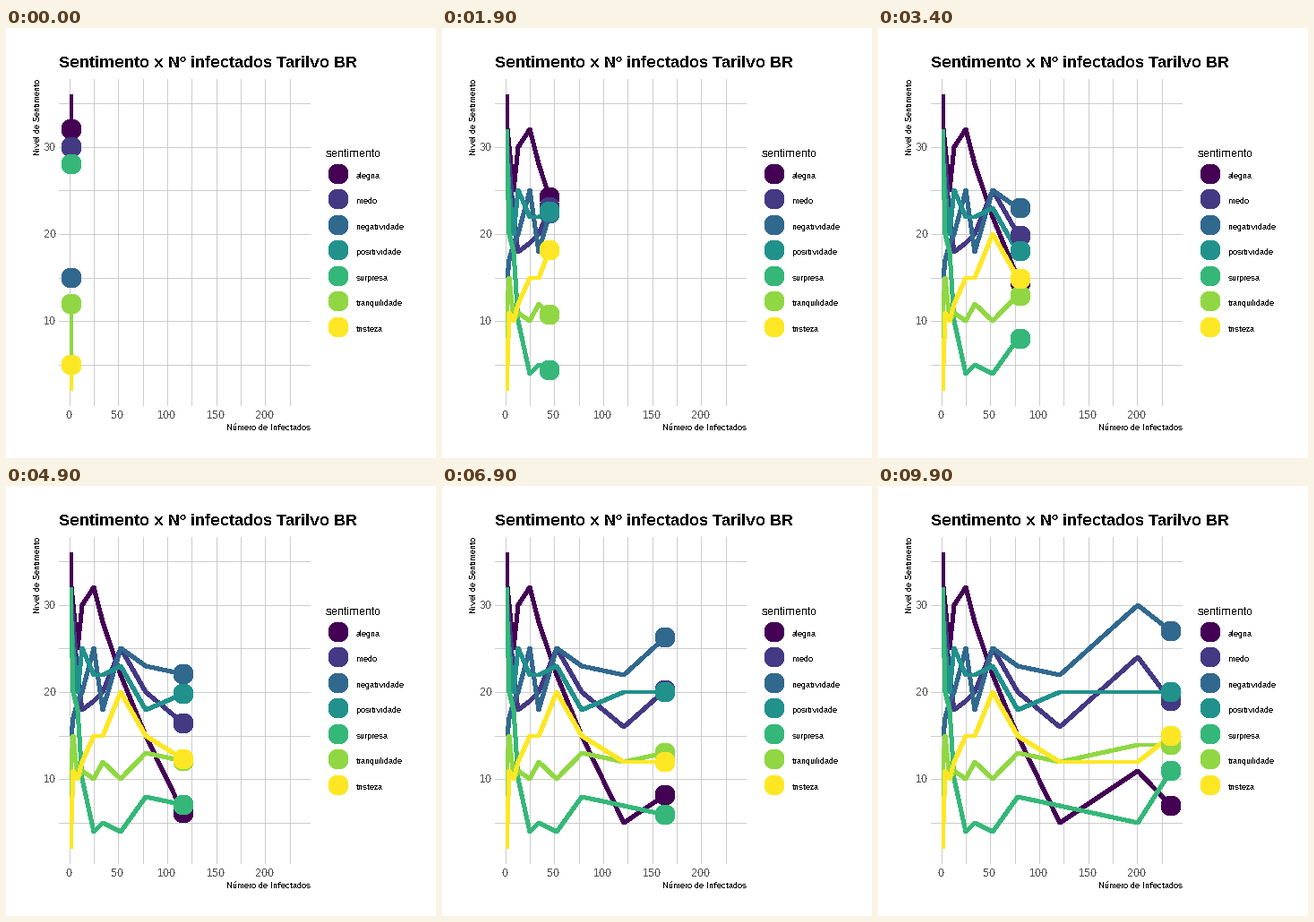
These frames come from a looping animation (480 px wide and 480 px high, 10 s). A matplotlib script:

```python
import numpy as np
import matplotlib.pyplot as plt
from matplotlib.animation import FuncAnimation
from matplotlib.patches import Circle

plt.rcParams.update({
    "font.family": "Liberation Sans",
    "text.hinting": "native",
    "text.hinting_factor": 1,
    "text.antialiased": False,
    "lines.antialiased": False,
    "patch.antialiased": False,
})

FRAMES = 100
PT = 0.72  # points per pixel at 100 dpi
RADIUS = 11

# turning points: case counts, and the level of each sentiment there
CASES = np.array([2, 2, 4, 8, 13, 25, 34, 52, 78, 121, 200, 234])
LEVELS = {
    "alegria": [36, 32, 30, 25, 30, 32, 28, 22, 15, 5, 11, 7],
    "medo": [30, 30, 28, 22, 18, 19, 20, 25, 20, 16, 24, 19],
    "negatividade": [15, 15, 17, 19, 20, 25, 18, 25, 23, 22, 30, 27],
    "positividade": [28, 28, 25, 20, 25, 22, 22, 23, 18, 20, 20, 20],
    "surpresa": [32, 28, 20, 18, 10, 4, 5, 4, 8, 7, 5, 11],
    "tranquilidade": [5, 12, 15, 10, 11, 10, 12, 10, 13, 12, 14, 14],
    "tristeza": [2, 5, 11, 10, 12, 15, 15, 20, 15, 12, 12, 15],
}

# each case count is reached on a whole animation step
STEPS = np.ceil((CASES - CASES[0]) * (FRAMES - 1) / np.ptp(CASES))


def px(x):
    return 71.2 + 1.0935 * np.asarray(x)


def py(y):
    return 84.6 + 9.735 * (35 - np.asarray(y))


def to_pixels(x, y):
    """Chart values to whole pixels."""
    return np.floor(px(x) + 0.2), np.floor(py(y))


fig = plt.figure(figsize=(4.8, 4.8), dpi=100, facecolor="white")
ax = fig.add_axes([0, 0, 1, 1])
ax.set_xlim(0, 480)
ax.set_ylim(480, 0)
ax.axis("off")


def label(x, y, text, size, color="black", **style):
    ax.text(x, y, text, fontsize=size * PT, color=color, va="baseline",
            rotation_mode="anchor", **style)


def dot(center, color, z):
    return ax.add_patch(Circle(center, RADIUS, fc=color, lw=0, zorder=z))


def stroke(xs, ys, color, width, z):
    line, = ax.plot(xs, ys, color=color, lw=width * PT, zorder=z, snap=False,
                    solid_capstyle="butt", solid_joinstyle="round")
    return line


# grid and tick labels
for v in range(0, 226, 25):
    x = np.floor(px(v)) + 0.5
    stroke([x, x], [57, 422], "#cccccc", 1, 1)
    if v % 50 == 0:
        label(x - 1, 436, str(v), 12, "#4d4d4d", ha="center")
for v in range(5, 36, 5):
    y = np.floor(py(v)) + 0.5
    stroke([59, 340], [y, y], "#cccccc", 1, 1)
    if v % 10 == 0:
        label(56, y + 3.5, str(v), 12, "#4d4d4d", ha="right")

label(59, 44, "Sentimento x Nº infectados Tarilvo BR", 18, weight="bold")
label(340, 449, "Número de Infectados", 9, ha="right")
label(38, 57, "Nivel de Sentimento", 9, ha="right", rotation=90)
label(357, 144, "sentimento", 12)

# legend, lines and moving dots
viridis = plt.get_cmap("viridis")
lines, dots = [], []
for i, name in enumerate(LEVELS):
    color = viridis(i / (len(LEVELS) - 1))
    y = np.floor(163 + 28.55 * i)
    dot((371, y), color, 4)
    label(391, y + 5, name, 9)
    lines.append(stroke([], [], color, 4, 2 + i / 10))
    dots.append(dot((0, 0), color, 3 + i / 10))


def update(k):
    n = np.searchsorted(STEPS, k, side="right")
    x = np.interp(k, STEPS, CASES)
    for line, point, levels in zip(lines, dots, LEVELS.values()):
        y = np.interp(k, STEPS, levels)
        xs, ys = to_pixels(np.r_[CASES[:n], x], np.r_[levels[:n], y])
        line.set_data(xs, ys)
        point.center = xs[-1], ys[-1]
    return lines + dots


anim = FuncAnimation(fig, update, frames=FRAMES, interval=100,
                     repeat=True, repeat_delay=0, blit=False)
plt.show()
```
